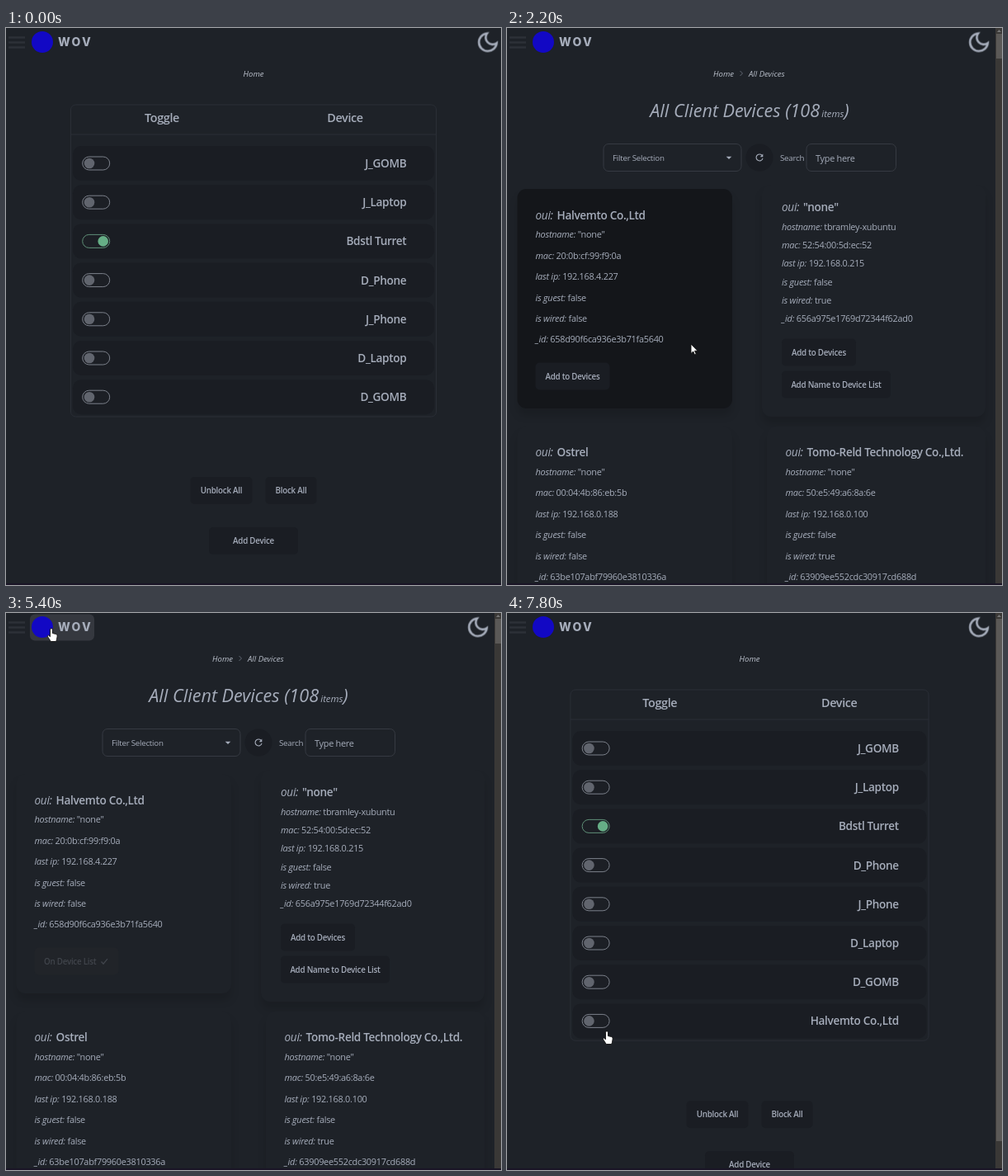
An HTML page for the animation above (8 s loop, 600 px wide and 675 px high).

```html
<!DOCTYPE html>
<html lang="en">
<head>
<meta charset="utf-8">
<title>Device manager</title>
<style>
  html, body { margin: 0; width: 100%; height: 100%; overflow: hidden; background: #1e2228; }
  svg { display: block; width: 600px; height: 675px; }
  text { font: 400 10.9px "Open Sans", "Noto Sans", sans-serif; letter-spacing: -.025em; fill: #a6adbb; white-space: pre; }
  .mid { text-anchor: middle; }
  .end { text-anchor: end; }
  .head { font-size: 14.4px; font-weight: 600; }
  .name { font-size: 13.6px; font-weight: 600; }
  .small { font-size: 9.75px; }
  .btn { font-size: 9.8px; font-weight: 600; }
  .crumb { font-size: 9.6px; font-style: italic; letter-spacing: 0; fill: #b9bfca; }
  .title { font-size: 21.7px; font-style: italic; letter-spacing: 0; }
  .title .unit { font-size: 11.5px; }
  .key { font-style: italic; font-weight: 400; letter-spacing: -.02em; }
  .brand { font: 800 14px Inter, sans-serif; letter-spacing: 2.2px; }
  .off { fill: #41454c; }
  .panel { fill: #1a1d23; }
  .card { fill: #1e2228; filter: drop-shadow(0 9px 5px #0002); }
  .line { fill: none; stroke: #2a2e36; }
  .field { fill: none; stroke: #363a42; }
  .icon { fill: none; stroke: #a6adbb; }
  #cursor { animation: travel 8s infinite; }
  #cursor path { fill: #fff; stroke: #111; stroke-width: .9; stroke-linejoin: round; }
  @keyframes travel {
    0%, 7.5% { transform: translate(330px, 668px); animation-timing-function: steps(3); }
    15%, 20% { transform: translate(306.5px, 624px); animation-timing-function: steps(3); }
    27.5%, 30% { transform: translate(223px, 383px); animation-timing-function: steps(4); }
    40%, 52.5% { transform: translate(96.5px, 430px); animation-timing-function: steps(5); }
    65%, 70% { transform: translate(55px, 19px); animation-timing-function: steps(3); }
    77.5% { transform: translate(346px, 508px); animation-timing-function: steps(1); }
    80% { transform: translate(347px, 513px); animation-timing-function: steps(1); }
    82.5%, 85% { transform: translate(338px, 511px); animation-timing-function: steps(4); }
    95%, 100% { transform: translate(121px, 507px); }
  }
</style>
</head>
<body>
<svg id="stage" viewBox="0 0 600 675"></svg>
<script>
const LOOP = 8000;
const HAND = 'M-1.5 1.2a1.5 1.5 0 0 1 3 0V5.6l4 .9q1.8.5 1.7 2.4l-.7 4.3-.8 2.3h-6.4l-3.6-5.6q-.8-1.6.6-2l2.2 1.8z';
const ARROW = 'M0 0V11.5l2.7-2.5 1.8 4 1.8-.8-1.8-3.9H8z';
const MAKER = 'Halvemto Co.,Ltd';
const DEVICES = ['J_GOMB', 'J_Laptop', 'Bdstl Turret', 'D_Phone', 'J_Phone', 'D_Laptop', 'D_GOMB', MAKER];
const ACTIVE = 2;
let rules = '', count = 0;

// Shows content only within the given [from, to] spans, in ms.
function during(spans, content) {
  const id = 'show' + count++;
  const at = (ms, on) => `${ms / LOOP * 100}%{opacity:${on}}`;
  rules += `@keyframes ${id}{${at(0, 0)}${spans.map(([a, b]) => at(a, 1) + at(b, 0)).join('')}}`;
  return `<g style="animation:${id} ${LOOP}ms step-end infinite">${content}</g>`;
}

const text = (x, y, cls, s) => `<text x="${x}" y="${y}" class="${cls}">${s}</text>`;
const box = (x, y, w, h, r, attrs = 'class="panel"') =>
  `<rect x="${x}" y="${y}" width="${w}" height="${h}" rx="${r}" ${attrs}/>`;
const path = (d, attrs = 'class="icon"') => `<path d="${d}" ${attrs}/>`;

function button(x, y, w, label, attrs, h = 33) {
  return box(x, y, w, h, 5, attrs) + text(x + w / 2, y + h / 2 + 3.6, 'mid btn', label);
}

function moon(x) {
  return `<g transform="translate(${x} 2.9) scale(1.2)">` +
    path('M21 12.79A9 9 0 1 1 11.21 3 7 7 0 0 0 21 12.79z', 'class="icon" stroke-width="2.2"') + '</g>';
}

function scrollbar(end) {
  return box(592, 0, 8, 675, 0, 'fill="#3a3836"') + box(593, 7, 7, end - 7, 0, 'fill="#5b5957"') +
    path('M594 5l2.5-3 2.5 3z', 'fill="#777"');
}

function toggle(x, y, on) {
  const color = on ? '#66ae86' : '#61656e';
  return box(x, y - 8, 33, 16, 8, `fill="#1c1f25" stroke="${on ? '#5f8f77' : '#7b808a'}"`) +
    `<circle cx="${x + (on ? 25 : 8.3)}" cy="${y}" r="6.3" fill="${color}"/>`;
}

function home(width, rows, addButton) {
  const mid = width / 2, w = width * .74, left = mid - w / 2;
  const extra = (rows - 7) * 47.2;
  let out = text(mid, 58.5, 'mid crumb', 'Home') +
    box(left + .5, 93, w - 1, 378 + extra, 6, 'class="line"') +
    path(`M${left} 129h${w}`, 'class="line"') +
    text(left + w / 4, 114, 'mid head', 'Toggle') +
    text(left + w * .75, 114, 'mid head', 'Device');
  DEVICES.slice(0, rows).forEach((name, i) => {
    const y = 164 + i * 47.2;
    out += box(left + 3, y - 21, w - 6, 42, 10) + toggle(left + 14.7, y, i === ACTIVE) +
      text(left + w - 36.7, y + 5, 'end name', name);
  });
  return out + button(mid - 76.5, 544 + extra, 75, 'Unblock All') +
    button(mid + 14.5, 544 + extra, 62, 'Block All') + addButton(mid - 54, 605 + extra);
}

function client(x, y, pitch, maker, values) {
  const keys = ['hostname', 'mac', 'last ip', 'is guest', 'is wired', '_id'];
  const key = s => `<tspan class="key">${s}: </tspan>`;
  return text(x, y, 'name', `${key('oui')}<tspan dx="1.5">${maker}</tspan>`) +
    keys.map((k, i) => text(x, y + 22.9 + i * pitch, '', key(k) + values[i])).join('');
}

function devices() {
  const none = '"none"';
  const hover = 'fill="#13151a"';
  return text(250, 58.5, 'crumb', 'Home') + path('M282.5 52l3 3-3 3', 'class="icon" opacity=".5"') +
    text(293, 58.5, 'crumb', 'All Devices') +
    text(294, 108, 'mid title', 'All Client Devices (108<tspan class="unit" dx="2">items</tspan>)') +
    box(117, 140.5, 167, 33, 6, 'class="field"') + text(128, 160.5, 'small', 'Filter Selection') +
    path('M265.7 155.7h6.6l-3.3 3.4z', 'fill="#a6adbb"') +
    '<circle cx="306" cy="157" r="16.5" class="panel"/>' +
    path('M309 154.2a4 4 0 1 0 1 3.6', 'class="icon" stroke-width="1.1"') +
    path('M310.3 152.6v3.6h-3.6z', 'fill="#a6adbb"') +
    text(331, 160.5, 'small', 'Search') +
    box(363, 140.5, 108.5, 33, 6, 'class="field"') + text(374, 161.8, '', 'Type here') +
    box(12.5, 195, 260.5, 266, 11, 'class="card"') + box(309, 190, 271, 281, 11, 'class="card"') +
    box(12.5, 483, 260.5, 266, 11, 'class="card"') + box(315, 483, 265, 266, 11, 'class="card"') +
    during([[2000, 4800]], box(12.5, 195, 260.5, 266, 11, 'fill="#14161a"')) +
    client(34.5, 231.5, 25.4, MAKER,
      [none, '20:0b:cf:99:f9:0a', '192.168.4.227', 'false', 'false', '658d90f6ca936e3b71fa5640']) +
    during([[0, 3000]], button(34.5, 405.5, 90, 'Add to Devices')) +
    during([[3000, 4000]], button(34.5, 405.5, 90, 'Add to Devices', hover)) +
    during([[4000, LOOP]], box(34.5, 405.5, 102, 33, 5, 'fill="#212429"') +
      text(46, 425.7, 'btn off', 'On Device List') +
      path('M115.5 422.5l2.5 2.7 5-6', 'fill="none" stroke="#41454c" stroke-width="1.3"')) +
    client(333, 221.7, 22.3, none,
      ['tbramley-xubuntu', '52:54:00:5d:ec:52', '192.168.0.215', 'false', 'true', '656a975e1769d72344f62ad0']) +
    button(333, 376.5, 90, 'Add to Devices') + button(333, 415.5, 132, 'Add Name to Device List') +
    client(34.5, 519, 25.4, 'Ostrel',
      [none, '00:04:4b:86:eb:5b', '192.168.0.188', 'false', 'false', '63be107abf79960e3810336a']) +
    client(337.5, 519, 25.4, 'Tomo-Reld Technology Co.,Ltd.',
      [none, '50:e5:49:a6:8a:6e', '192.168.0.100', 'false', 'true', '63909ee552cdc30917cd688d']);
}

function addStates(x, y) {
  const dark = 'fill="#13161a"';
  return during([[0, 1000]], button(x, y, 108, 'Add Device')) +
    during([[1000, 1400]], button(x, y, 108, 'Add Device', dark)) +
    during([[1400, LOOP]], button(x + 2, y + .5, 104, 'Add Device', dark, 32));
}

const header = [11.5, 17.5, 23.5].map(y => path(`M3 ${y}h20`, 'stroke="#2d3138" stroke-width="2.4"')).join('') +
  during([[5200, 5800]], box(29, 1.5, 78, 32, 6, 'fill="#35383f"')) +
  '<circle cx="44" cy="17" r="13" fill="#1208c4"/>' + text(63, 22, 'brand', 'WOV');

const cursor = '<g id="cursor">' +
  during([[600, 1000], [1600, 3000], [4000, 5200], [5800, 6200]], path(ARROW, '')) +
  during([[1000, 1600], [3000, 4000], [5200, 5800], [6200, LOOP]], path(HAND, '')) + '</g>';

const scene =
  during([[0, 1600]], home(600, 7, addStates) + moon(569.6)) +
  during([[1600, 5600]], devices() + moon(557.6) + scrollbar(37)) +
  during([[5600, LOOP]], home(588, 8, (x, y) => button(x, y, 108, 'Add Device')) + moon(557.6) + scrollbar(640)) +
  header + box(0, 673, 600, 2, 0, 'fill="#1a1526"') + cursor;

document.head.insertAdjacentHTML('beforeend', `<style>${rules}</style>`);
document.getElementById('stage').innerHTML = scene;
</script>
</body>
</html>
```
